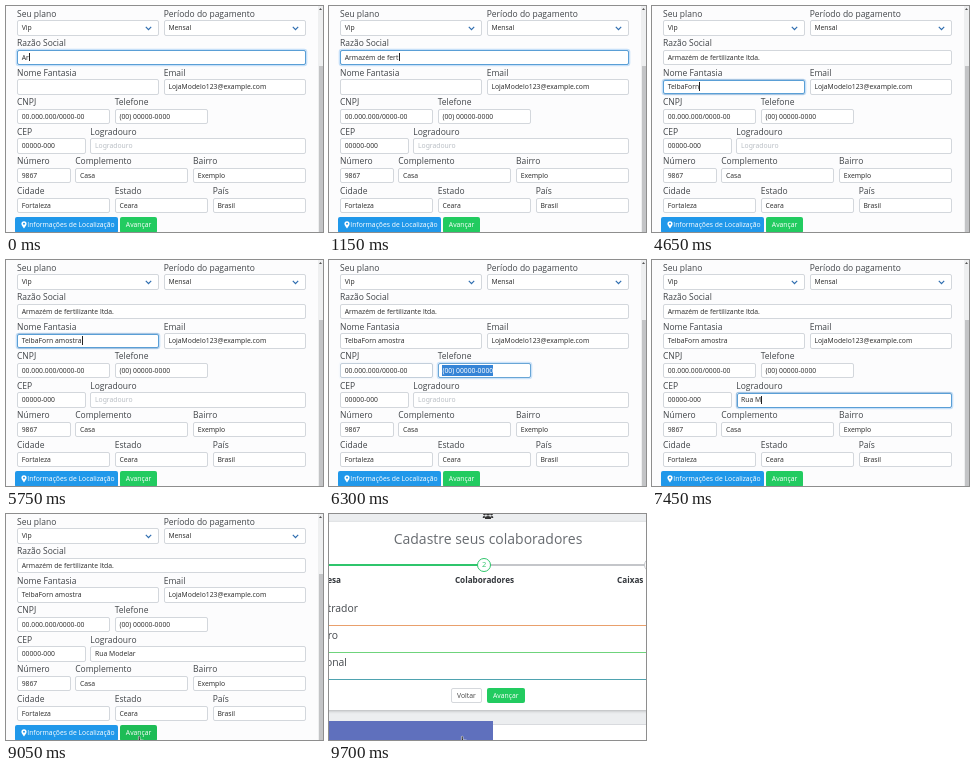
Animation, 317 px wide and 226 px high, one loop 9750 ms. Source, as an HTML page:

```html
<!DOCTYPE html>
<html lang="pt-BR">
<head>
<meta charset="utf-8">
<title>Cadastro</title>
<style>
  html, body { margin: 0; width: 100%; height: 100%; overflow: hidden; }
  #stage { position: relative; width: 317px; height: 226px; overflow: hidden; background: #fcfcfd;
    font-family: "Open Sans", "Noto Sans", sans-serif; color: #404448; }
  #stage div, #stage span, #stage svg { position: absolute; box-sizing: border-box; white-space: pre; }
  .page { inset: 0; }
  .label { font-size: 8.5px; line-height: 12px; }
  .field { height: 15.4px; border: .6px solid #d3d7dc; border-radius: 2px; background: #fff;
    font: 6.8px/14px "Noto Sans", sans-serif; color: #333; }
  .field::after { content: ""; position: absolute; inset: -.8px; border: 1px solid #5a9fd6; border-radius: 2px;
    box-shadow: 0 0 0 1.3px rgba(60, 150, 235, .28); opacity: var(--focus, 0); }
  #stage .text { position: absolute; left: 3.7px; top: 0; }
  .text b { font-weight: 400; padding: 1px 0; }
  .text i { display: inline-block; width: .7px; height: 8.5px; margin-left: .2px; background: #222; vertical-align: -1.7px; }
  .selected b { background: #3584d6; color: #fff; }
  .empty { color: #b9bec4; }
  .button { border-radius: 2px; font-size: 6.8px; line-height: 15.4px; height: 15.6px; text-align: center; color: #fff; background: #22cb60; }
  .rule { left: 0; width: 317px; height: 1px; }
  .dot { width: 14px; height: 14px; border-radius: 50%; border: 1.4px solid #c4c6ca; background: #fff;
    font-size: 7.5px; line-height: 11px; text-align: center; }
  .step { font-weight: 700; font-size: 8.2px; line-height: 12px; top: 59.5px; color: #33373c; }
  .role { font-size: 10.4px; line-height: 14px; color: #44484d; }
</style>
</head>
<body>
<div id="stage">
  <div class="page" id="form">
    <div class="button" style="left:9px;top:211.3px;width:103px;background:#2098ea;padding-left:9px">Informações de Localização</div>
    <svg style="left:14.5px;top:215.3px" width="6" height="8" viewBox="0 0 6 8">
      <path fill="#fff" fill-rule="evenodd" d="M3 7.6C1.8 5.8.4 4.3.4 2.8a2.6 2.6 0 0 1 5.2 0C5.6 4.3 4.2 5.8 3 7.6ZM3 1.8a1 1 0 1 0 0 2 1 1 0 0 0 0-2Z"/>
    </svg>
    <div class="button" id="next" style="left:114.2px;top:211.3px;width:36.8px">Avançar</div>
    <div style="left:312px;top:0;width:5px;height:226px;background:#eeeff0"></div>
    <div style="left:312.5px;top:60px;width:4.5px;height:166px;background:#c3c4c6"></div>
    <svg style="left:312px;top:0" width="5" height="6"><path d="M1 4 2.5 2 4 4Z" fill="#555"/></svg>
  </div>

  <div class="page" id="team" style="background:#eceef0">
    <svg style="left:153px;top:-4px" width="12" height="10" viewBox="0 0 12 10" fill="#333">
      <circle cx="6" cy="3.5" r="2"/><circle cx="2.5" cy="4" r="1.4"/><circle cx="9.5" cy="4" r="1.4"/>
      <path d="M3 9V7.5Q3 6 6 6T9 7.5V9ZM.8 8V7Q.8 5.8 2.8 6V8ZM9.2 8V6Q11.2 5.8 11.2 7V8Z"/>
    </svg>
    <div style="left:-5px;top:8px;width:327px;height:188px;background:#fff;box-shadow:0 1px 3px rgba(0,0,0,.25)"></div>
    <div style="left:0;top:15px;width:318px;text-align:center;font-size:14px;line-height:20px;color:#686c71">Cadastre seus colaboradores</div>
    <div style="left:0;top:50.4px;width:317px;height:1.3px;background:#c4c6ca"></div>
    <div id="bar" style="left:0;top:50.2px;width:155px;height:1.7px;background:#2fc56c;transform-origin:0 0"></div>
    <div class="dot" id="dot" style="left:148.2px;top:44px">2</div>
    <div class="dot" style="left:315px;top:44px">3</div>
    <span class="step" style="right:305px">Empresa</span>
    <span class="step" style="left:105px;width:101px;text-align:center">Colaboradores</span>
    <span class="step" style="left:288px">Caixas</span>
    <span class="role" style="right:288px;top:87px">Administrador</span>
    <span class="role" style="right:308px;top:114px">Financeiro</span>
    <span class="role" style="right:299px;top:141px">Operacional</span>
    <div class="rule" style="top:111px;background:#e9a06c"></div>
    <div class="rule" style="top:138px;background:#6fd47c"></div>
    <div class="rule" style="top:165px;background:#4fa3b0"></div>
    <div class="button" style="left:121.8px;top:173.6px;width:31.2px;color:#444;background:#fff;border:.6px solid #d5d8dc;line-height:14.4px">Voltar</div>
    <div class="button" style="left:157.5px;top:173.6px;width:38.5px">Avançar</div>
    <div style="left:0;top:207px;width:164px;height:19px;background:#5f70bd"></div>
    <div style="left:164px;top:210px;width:153px;height:16px;background:#fff;border-top:.6px solid #d8dade"></div>
  </div>

  <svg id="cursor" style="left:0;top:0" width="10" height="13" viewBox="0 0 10 13" stroke="#fff" stroke-width=".6" fill="#111">
    <path id="arrow" d="M.5.5V8.5L2.4 6.8 3.7 9.6 5 9 3.7 6.3H6.2Z"/>
    <path id="hand" d="M2.4 1Q3.2 0 4 1V4L7.6 4.8Q8.6 5 8.4 6.4L7.6 9.5H3.4L.7 6.2Q.8 5 2.4 6Z"/>
  </svg>
</div>

<script>
const LOOP = 9750, FADE = 150, SWAP = 9450;
const $ = id => document.getElementById(id);
const ramp = (t, a, b) => Math.min(1, Math.max(0, (t - a) / (b - a)));

// row, left, right, label, value, options
const FIELDS = [
  [0, 11, 153, 'Seu plano', 'Vip', { select: true }],
  [0, 157.7, 300, 'Período do pagamento', 'Mensal', { select: true }],
  [1, 11, 300, 'Razão Social', 'Armazém de fertilizante ltda.', { focus: [-FADE, 3250], keys: [
    [0, 0, 2, 2], [50, 850, 3, 12], [1000, 1150, 13, 15], [1300, 1600, 16, 20], [1850, 1950, 21, 22],
    [2200, 2200, 23, 23], [2400, 2400, 24, 24], [2600, 2650, 25, 26], [2800, 2850, 27, 28], [3050, 3050, 29, 29]] }],
  [2, 11, 153, 'Nome Fantasia', 'TelbaForn amostra', { focus: [3250, 6000], keys: [
    [3800, 3800, 1, 1], [3950, 4150, 2, 5], [4400, 4650, 6, 9], [5200, 5750, 10, 17]] }],
  [2, 157.7, 300, 'Email', 'LojaModelo123@example.com', { focus: [6000, 6080] }],
  [3, 11, 104, 'CNPJ', '00.000.000/0000-00', { focus: [6080, 6170] }],
  [3, 108.7, 202, 'Telefone', '(00) 00000-0000', { focus: [6170, 6340] }],
  [4, 11, 80, 'CEP', '00000-000', { focus: [6340, 6430] }],
  [4, 84.3, 300, 'Logradouro', 'Rua Modelar', { focus: [6430, 8600], hint: 'Logradouro', keys: [
    [6800, 7150, 1, 3], [7300, 7450, 4, 5], [7500, 7950, 6, 11]] }],
  [5, 11, 64.7, 'Número', '9867', {}],
  [5, 69.2, 182.5, 'Complemento', 'Casa', {}],
  [5, 187, 300, 'Bairro', 'Exemplo', {}],
  [6, 11, 104, 'Cidade', 'Fortaleza', {}],
  [6, 108.7, 202, 'Estado', 'Ceara', {}],
  [6, 206.7, 300, 'País', 'Brasil', {}],
];

function add(parent, tag, cls, style, text = '') {
  const el = document.createElement(tag);
  el.className = cls;
  el.style.cssText = style;
  el.textContent = text;
  return parent.appendChild(el);
}

const live = [];
for (const [row, left, right, label, value, opt] of FIELDS) {
  const y = row * 29.55;
  add($('form'), 'span', 'label', `left:${left}px;top:${1.7 + y}px`, label);
  const box = add($('form'), 'div', 'field', `left:${left}px;top:${14.2 + y}px;width:${right - left}px`);
  const text = add(box, 'span', 'text', '');
  const body = add(text, 'b', '', '', value);
  const caret = add(text, 'i', '', 'display:none');
  if (opt.select) {
    box.insertAdjacentHTML('beforeend', `<svg style="right:6px;top:5px" width="7" height="5" fill="none"
      stroke="#2f6eb0" stroke-width="1.2"><path d="M.8.8 3.5 3.6 6.2.8"/></svg>`);
  }
  if (opt.focus) live.push({ ...opt, value, box, text, body, caret });
}

function typed(keys, t) {
  let n = 0;
  for (const [a, b, from, to] of keys) {
    if (t >= a) n = from + Math.floor((to - from) * (b > a ? ramp(t, a, b) : 1) + 1e-6);
  }
  return n;
}

function drawField(f, t) {
  const [on, off] = f.focus;
  const active = t >= on && t < off;
  f.box.style.setProperty('--focus', ramp(t, on, on + FADE) * (1 - ramp(t, off, off + FADE)));
  if (!f.keys) {
    f.text.classList.toggle('selected', active);
    return;
  }
  const n = typed(f.keys, t);
  const hinted = !n && f.hint;
  f.body.textContent = hinted ? f.hint : f.value.slice(0, n);
  f.text.classList.toggle('empty', !!hinted);
  f.caret.style.display = active && !hinted ? '' : 'none';
}

function draw(t) {
  live.forEach(f => drawField(f, t));
  const swapped = t >= SWAP;
  $('form').style.display = swapped ? 'none' : '';
  $('team').style.display = swapped ? '' : 'none';

  const hover = ramp(t, 8550, 8700);
  $('next').style.background = `rgb(${34 - 5 * hover}, ${203 - 15 * hover}, ${96 - 10 * hover})`;

  const grow = ramp(t, SWAP, 9650);
  $('bar').style.transform = `scaleX(${grow})`;
  $('dot').style.borderColor = $('dot').style.color = grow > .9 ? '#2fc56c' : '#c4c6ca';

  const move = ramp(t, 8150, 8350), settle = ramp(t, 8550, 8750);
  const ease = move * move * (3 - 2 * move);
  const x = 285 - 160 * ease + 5 * settle, y = 140 + 79 * ease + 2.5 * settle;
  const over = move === 1;
  $('cursor').style.display = t >= 8200 ? '' : 'none';
  $('cursor').style.transform = `translate(${x}px, ${y}px)`;
  $('arrow').style.display = over ? 'none' : '';
  $('hand').style.display = over ? '' : 'none';
}

const start = performance.now();
function tick() {
  draw((performance.now() - start) % LOOP);
  requestAnimationFrame(tick);
}
tick();
</script>
</body>
</html>
```
